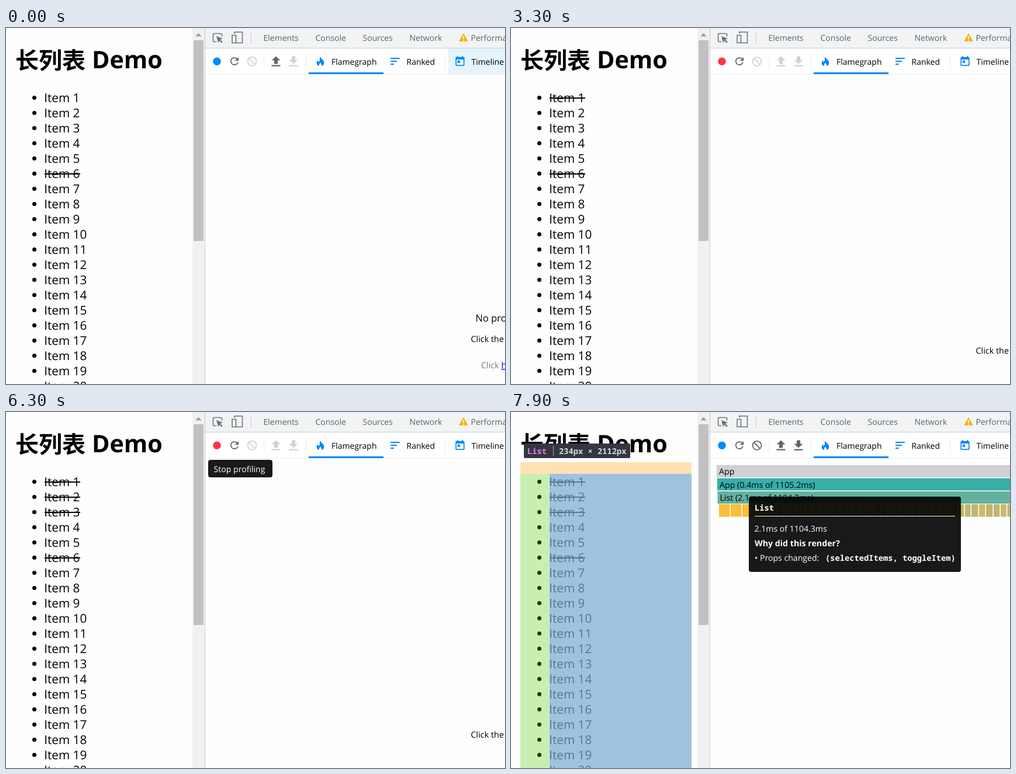
These frames come from a looping animation (854x610 px, 8000 ms). An HTML page:

```html
<!DOCTYPE html>
<html lang="zh">
<head>
<meta charset="utf-8">
<title>长列表 Demo</title>
<style>
  html, body { margin: 0; width: 100%; height: 100%; overflow: hidden; background: #fff; }
  svg { display: block; width: 854px; height: 610px; }
  text { font: 14px "Open Sans", "Noto Sans", sans-serif; text-rendering: geometricPrecision; white-space: pre; }
  .h { font-size: 41.2px; font-weight: 700; }
  .cjk { font: 700 40px "Noto Sans CJK SC", "Noto Sans CJK", sans-serif; }
  .item text { font-size: 20.7px; }
  .tab text { fill: #5f6368; }
  .row text { font-size: 14.2px; }
  .hint text { font-size: 14.4px; }
  .hint .big { font-size: 16.5px; }
  .tip text { fill: #fff; font-size: 14.1px; }
  text.mono { font: 700 13.75px "Noto Sans Mono", "DejaVu Sans Mono", monospace; }
  text.b { font-weight: 700; font-size: 14.2px; }
  text.name { fill: #ee78e6; }
  text.dim { fill: #d7d7d7; }
</style>
</head>
<body>
<svg viewBox="0 0 854 610" xmlns="http://www.w3.org/2000/svg">
  <rect width="854" height="610" fill="#fefefe"/>

  <!-- page -->
  <text class="cjk" x="16" y="70">长列表</text>
  <text class="h" x="147" y="69">Demo</text>
  <g id="items" class="item"></g>
  <rect x="319" width="21" height="610" fill="#f1f1f2"/>
  <rect id="thumb" x="321" y="21" width="17" height="344"/>
  <path d="M324 14.5h11l-5.5-6z" fill="#a3a3a3"/>

  <!-- tab bar -->
  <rect x="340" width="514" height="34" fill="#f1f3f4"/>
  <path d="M340.5 0V610M341 34.5H854M419.5 7V27" stroke="#cacdd1"/>
  <g fill="none" stroke="#6e7377" stroke-width="1.6">
    <path d="M360 23.5h-3.5a2 2 0 0 1-2-2v-10a2 2 0 0 1 2-2h11a2 2 0 0 1 2 2v3"/>
    <path d="M391 10V7h13.5v18.5H394M387 12.5h6.5v13H387z"/>
  </g>
  <path d="M360 14l11 4-4.3 2 4 4-1.7 1.7-4-4-1.8 4z" fill="#6e7377"/>
  <path d="M783 10l7 12.5h-14z" fill="#f4b400" stroke="#f4b400" stroke-linejoin="round"/>
  <path d="M783 13.5v5M783 20v1.8" stroke="#fff" stroke-width="1.7"/>
  <g class="tab">
    <text x="440.5" y="22">Elements</text>
    <text x="529.5" y="22">Console</text>
    <text x="610.5" y="22">Sources</text>
    <text x="690.5" y="22">Network</text>
    <text x="795.5" y="22">Performance</text>
  </g>

  <!-- profiler bar -->
  <rect x="341" y="35" width="513" height="44" fill="#fff"/>
  <rect id="hover" x="757" y="35" width="97" height="44" fill="#e5f4fd"/>
  <path d="M341 79.5H854M441.5 44V70M513.5 44V70M751.5 44V70" stroke="#ededed"/>
  <rect x="518" y="76" width="128" height="3" fill="#0088fa"/>
  <circle id="record" cx="361" cy="57.3" r="6.7"/>
  <path transform="translate(380.5 46.5) scale(.875)" fill="#5f6673" d="M17.65 6.35C16.2 4.9 14.21 4 12 4c-4.42 0-7.99 3.58-7.99 8s3.57 8 7.99 8c3.73 0 6.84-2.55 7.73-6h-2.08c-.82 2.33-3.04 4-5.65 4-3.31 0-6-2.69-6-6s2.69-6 6-6c1.66 0 3.14.69 4.22 1.78L13 11h7V4z"/>
  <g id="clear" fill="none" stroke-width="1.8"><circle cx="421" cy="57.3" r="7.5"/><path d="M415.7 52l10.6 10.6"/></g>
  <path id="upload" d="M459 61.5v-6h-4.5l7.5-7 7.5 7H465v6zM454.5 63.5h15v2.3h-15z"/>
  <path id="download" d="M489 48.5v6h-4.5l7.5 7 7.5-7H495v-6zM484.5 63.5h15v2.3h-15z"/>
  <g fill="#0088fa">
    <path d="M538 49c1 4 6.3 6 6.3 10.5a6 6 0 0 1-4.3 5.7c1-3-1-4-2-6-1 2-3 3-2 6a6 6 0 0 1-4.3-5.7c0-2 1-3.5 2-4.5 0 2 1 3 2 3 2-2 .3-5 2.3-9z"/>
    <path d="M658 51h16v2h-16zM658 56h11v2h-11zM658 61h6v2h-6z"/>
    <path transform="translate(766.8 47.2) scale(.85)" d="M19 3h-1V1h-2v2H8V1H6v2H5c-1.11 0-1.99.9-1.99 2L3 19c0 1.1.89 2 2 2h14c1.1 0 2-.9 2-2V5c0-1.1-.9-2-2-2zm0 16H5V8h14v11zM7 10h5v5H7z"/>
  </g>
  <text x="557" y="63">Flamegraph</text>
  <text x="685.5" y="63">Ranked</text>
  <text x="796.5" y="63">Timeline</text>

  <!-- panel -->
  <g id="empty" class="hint">
    <text class="big" x="803.5" y="503">No profiling data</text>
    <text x="795.5" y="538">Click the record</text>
    <text x="813" y="583" fill="#777">Click <tspan fill="#00e" text-decoration="underline">here</tspan></text>
  </g>
  <g id="busy" class="hint"><text x="795.5" y="558">Click the record</text></g>
  <g id="flame" class="row"></g>

  <!-- overlays -->
  <g id="start" class="tip">
    <rect x="346" y="82" width="111" height="30" rx="4" fill="#191919"/>
    <text x="355.5" y="103">Start profiling</text>
  </g>
  <g id="stop" class="tip">
    <rect x="346" y="82" width="110" height="30" rx="4" fill="#191919"/>
    <text x="355.5" y="103">Stop profiling</text>
  </g>
  <g id="app">
    <rect x="16" y="27" width="293" height="583" fill="rgba(120,170,210,.7)"/>
    <rect x="22" y="6" width="174" height="26" rx="2" fill="#333740"/>
    <path d="M63.5 10V27" stroke="#a5a7ab"/>
    <text class="mono name" x="28" y="24">App</text>
    <text class="mono dim" x="74" y="24">234px × 2143px</text>
    <g id="appTip" class="tip">
      <rect width="120" height="64" rx="4" fill="rgba(0,0,0,.9)"/>
      <text class="mono" x="10" y="24">App</text>
      <path d="M10 33.5h100" stroke="#fff"/>
      <text x="9" y="55">Did not render.</text>
    </g>
  </g>
  <g id="list">
    <rect x="16" y="86" width="293" height="20" fill="rgba(255,155,0,.3)"/>
    <rect x="16" y="106" width="50" height="504" fill="rgba(77,200,0,.3)"/>
    <rect x="66" y="106" width="243" height="504" fill="rgba(120,170,210,.7)"/>
    <rect x="22" y="54" width="182" height="25" rx="2" fill="#333740"/>
    <path d="M72.5 58V75" stroke="#a5a7ab"/>
    <text class="mono name" x="28" y="72">List</text>
    <text class="mono dim" x="82" y="72">234px × 2112px</text>
    <g id="listTip" class="tip">
      <rect width="363" height="129" rx="4" fill="rgba(0,0,0,.9)"/>
      <text class="mono" x="10" y="24">List</text>
      <path d="M10 33.5h343" stroke="#fff"/>
      <text x="9.5" y="60">2.1ms of 1104.3ms</text>
      <text class="b" x="10" y="85">Why did this render?</text>
      <text x="10" y="110">• Props changed:</text>
      <text class="mono" x="131" y="110">(selectedItems, toggleItem)</text>
    </g>
  </g>
</svg>
<script>
const LOOP = 8000;
const $ = id => document.getElementById(id);
const rect = (x, y, w, h, fill) => `<rect x="${x}" y="${y}" width="${w}" height="${h}" fill="${fill}"/>`;

// item number -> time it is struck out
const struck = { 1: 3300, 2: 4600, 3: 5800, 6: 0 };
let html = '';
for (let n = 1; n <= 20; n++) {
  const y = 94 + 26 * n;
  html += `<circle cx="48.5" cy="${y - .5}" r="3.5"/><text x="65.3" y="${y + 7}">Item ${n}</text>`;
  if (n in struck) html += `<rect id="line${n}" x="66" y="${y - 1}" width="61" height="2"/>`;
}
$('items').innerHTML = html;

const bar = (x, y, fill, label) =>
  rect(x, y, 854 - x, 21, fill) + `<text x="${x + 4}" y="${y + 16}">${label}</text>`;
const shades = ['#beb771', '#cfb965', '#dfba57', '#efbb49', '#febc38'];
const starts = [356, 376, 396, 413, 428, 444, 455, 467, 478, 490, 505, 518, 530, 541, 553, 564, 575, 586, 597, 608,
  619, 634, 645, 656, 667, 678, 689, 700, 711, 721.5, 735, 751.5, 766, 777, 788, 801, 813, 826, 838, 849.5, 861];
const tones = '4443300002100000000010000000014100010010';
$('flame').innerHTML =
  bar(352, 91, '#cfd0d6', 'App') +
  bar(353, 113.5, '#37afa9', 'App (0.4ms of 1105.2ms)') +
  bar(353.5, 136, '#63b19e', 'List (2.1ms of 1104.3ms)') +
  [...tones].map((c, i) => rect(starts[i], 158, starts[i + 1] - starts[i] - 1.6, 21.5, shades[c])).join('');

function draw(t) {
  const within = (a, b) => t >= a && t < b;
  const show = (id, on) => $(id).style.display = on ? '' : 'none';
  const enable = (id, on, attr = 'fill') => $(id).setAttribute(attr, on ? '#5f6673' : '#cfd1d5');
  const recording = within(1200, 6600), done = t >= 6700;

  for (const n in struck) show('line' + n, t >= struck[n]);
  $('thumb').setAttribute('fill', within(5800, 6000) ? '#a8a8a8' : '#c1c1c1');
  $('record').setAttribute('fill', recording ? '#ff3344' : '#0088fa');
  enable('clear', done, 'stroke');
  enable('upload', t < 1200 || done);
  enable('download', done);

  show('hover', t < 100);
  show('empty', t < 1200);
  show('busy', recording);
  show('flame', done);
  show('start', within(500, 1100));
  show('stop', within(6300, 6500));
  show('app', within(7600, 7800));
  show('list', t >= 7800);

  // the tip follows the pointer in 100 ms steps
  const step = Math.max(0, Math.floor((t - 7600) / 100));
  const at = `translate(${405 + Math.round(step * 2 / 3)} ${109 + 12 * step})`;
  $('appTip').setAttribute('transform', at);
  $('listTip').setAttribute('transform', at);
}

const begin = performance.now();
function tick() {
  draw((performance.now() - begin) % LOOP);
  requestAnimationFrame(tick);
}
tick();
</script>
</body>
</html>
```
